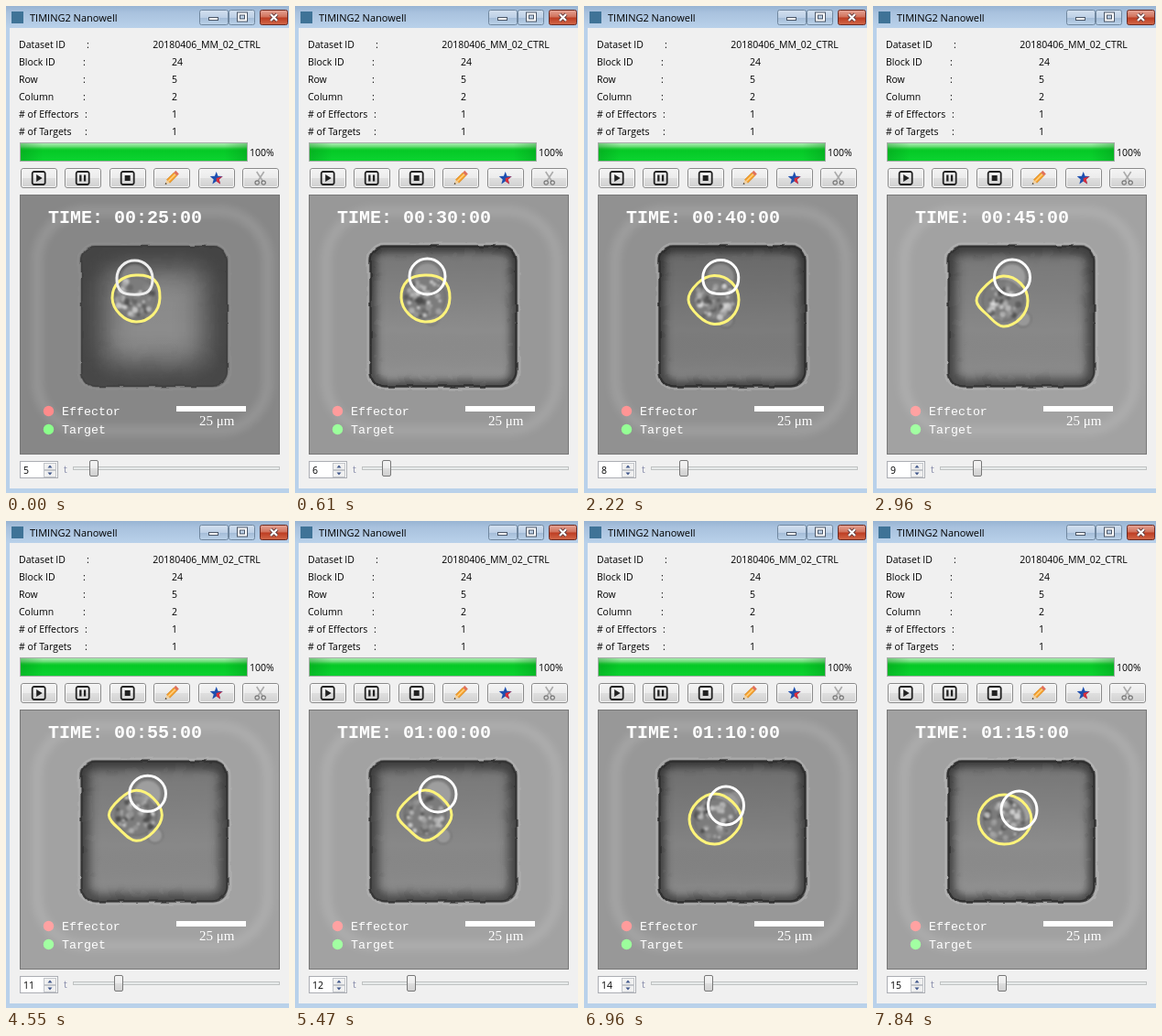
Write an HTML page that moves like this. It is 309x532 px and loops after 8000 ms.

```html
<!DOCTYPE html>
<html lang="en">
<head>
<meta charset="utf-8">
<title>Nanowell viewer</title>
<style>
  html, body { margin: 0; width: 100%; height: 100%; overflow: hidden; background: #f0f0f0; }
  svg { display: block; width: 100%; height: 100%; }
  text { font: 10.5px "Open Sans", "Noto Sans", sans-serif; fill: #000; white-space: pre; }
  .mono { font: 13.3px "Liberation Mono", monospace; fill: #fff; }
  .time { font-size: 20px; font-weight: bold; }
  .scale { font: 15px "Liberation Serif", serif; fill: #fff; }
  .outline { fill: none; stroke-width: 3; stroke-linejoin: round; }
</style>
</head>
<body>
<svg viewBox="0 0 309 532" color-interpolation-filters="sRGB">
  <defs>
    <linearGradient id="titleFill" x2="0" y2="1">
      <stop stop-color="#98b4d3"/><stop offset=".3" stop-color="#a9c2de"/><stop offset="1" stop-color="#b9d1ea"/>
    </linearGradient>
    <linearGradient id="buttonFill" x2="0" y2="1">
      <stop stop-color="#f4f4f4"/><stop offset=".48" stop-color="#ececec"/>
      <stop offset=".52" stop-color="#dedede"/><stop offset="1" stop-color="#d0d0d0"/>
    </linearGradient>
    <linearGradient id="captionFill" x2="0" y2="1">
      <stop stop-color="#d3e0ef"/><stop offset=".5" stop-color="#bdd0e6"/><stop offset=".52" stop-color="#a3bbd6"/><stop offset="1" stop-color="#bcd3ea"/>
    </linearGradient>
    <linearGradient id="closeFill" x2="0" y2="1">
      <stop stop-color="#e6a596"/><stop offset=".48" stop-color="#d0705a"/><stop offset=".52" stop-color="#bd3c22"/><stop offset="1" stop-color="#d2694a"/>
    </linearGradient>
    <linearGradient id="progressFill" x2="0" y2="1">
      <stop stop-color="#b4f0ba"/><stop offset=".2" stop-color="#6bdd78"/><stop offset=".32" stop-color="#1fce38"/>
      <stop offset=".42" stop-color="#05c926"/><stop offset="1" stop-color="#0cd331"/>
    </linearGradient>
    <linearGradient id="progressEnds">
      <stop stop-color="#007d12" stop-opacity=".3"/><stop offset=".1" stop-color="#007d12" stop-opacity="0"/>
      <stop offset=".9" stop-color="#007d12" stop-opacity="0"/><stop offset="1" stop-color="#007d12" stop-opacity=".3"/>
    </linearGradient>
    <linearGradient id="wellShade" x2="0" y2="1">
      <stop stop-color="#000" stop-opacity=".17"/><stop offset=".6" stop-color="#000" stop-opacity="0"/>
      <stop offset="1" stop-color="#fff" stop-opacity=".1"/>
    </linearGradient>
    <filter id="rough" x="-10%" y="-10%" width="120%" height="120%">
      <feTurbulence type="fractalNoise" baseFrequency=".06" numOctaves="2" seed="4"/>
      <feDisplacementMap in="SourceGraphic" scale="4" xChannelSelector="R" yChannelSelector="G"/>
    </filter>
    <clipPath id="view"><rect x="15" y="206" width="284" height="284"/></clipPath>
    <clipPath id="wellClip"><rect x="82" y="262" width="160" height="154" rx="16"/></clipPath>
  </defs>
  <g id="chrome"></g>
  <g id="microscope" clip-path="url(#view)"></g>
  <g id="controls"></g>
</svg>
<script>
const LOOP = 8000, FIRST = 5;
const starts = [0, 610, 1340, 2220, 2960, 3830, 4550, 5470, 6220, 6960, 7840];

// Per step: outer grey, well grey, depth of the wall shadow
const scene = [
  [135, 140, 52], [152, 140, 14], [133, 117, 12], [145, 124, 14], [162, 136, 18], [162, 136, 18],
  [162, 136, 18], [162, 136, 18], [162, 136, 16], [152, 131, 14], [161, 140, 14]
];
// Keyed by step: x, y, rx, ry, flatness of the lower side
const effector = {
  5: [140.5, 297, 19.5, 19, 1.6], 6: [144.5, 295.5, 19.5, 19.5, 0], 7: [146.5, 296, 19.5, 18, 2.2],
  9: [152, 296.5, 19.5, 19.5, 0], 12: [156, 298.5, 20, 19.5, 0], 14: [155, 311, 19.5, 21, 0], 15: [159.5, 316, 19.5, 21, 0]
};
// Keyed by step: x, y, then radii clockwise from the right
const target = {
  5: [142, 319, 26, 26, 26, 25, 26, 26, 25, 28], 6: [142, 319, 27, 27, 26, 25, 26, 27, 25, 28],
  7: [142, 320, 27, 27, 25, 26, 27, 26, 26, 27], 9: [142, 322, 27, 27, 28, 23, 29, 25, 27, 27],
  12: [142, 321, 29, 26, 28, 24, 30, 25, 27, 26], 14: [143, 326, 29, 26, 27, 27, 28, 27, 28, 27],
  15: [143, 326, 30, 28, 27, 27, 28, 27, 27, 28]
};
// Keyed by step: centre of the pale bulge beside the cell
const bulge = { 5: [143, 339], 6: [149, 340], 7: [146, 344], 9: [164, 342], 12: [162, 344], 14: [165, 303], 15: [152, 330] };

const $ = id => document.getElementById(id);
const grey = v => `rgb(${v},${v},${v})`;
const rect = (x, y, w, h, fill, more = '') => `<rect x="${x}" y="${y}" width="${w}" height="${h}" fill="${fill}" ${more}/>`;
const circle = (x, y, r, fill, more = '') => `<circle cx="${x}" cy="${y}" r="${r}" fill="${fill}" ${more}/>`;
const path = (d, fill, more = '') => `<path d="${d}" fill="${fill}" ${more}/>`;
const label = (x, y, s, more = '') => `<text x="${x}" y="${y}" ${more}>${s}</text>`;
const blur = px => `style="filter:blur(${px}px)"`;

function keyed(table, step) {
  if (table[step]) return table[step];
  const keys = Object.keys(table).map(Number);
  const b = keys.find(k => k > step), a = keys[keys.indexOf(b) - 1];
  return table[a].map((v, i) => v + (table[b][i] - v) * (step - a) / (b - a));
}

// Closed smooth curve through eight points around a centre
function blob(x, y, radii) {
  const pts = radii.map(([rx, ry], i) => [x + rx * Math.cos(i * Math.PI / 4), y + ry * Math.sin(i * Math.PI / 4)]);
  const at = i => pts[(i + 8) % 8];
  const handle = (i, s) => at(i).map((v, k) => v + s * (at(i + 1)[k] - at(i - 1)[k]) / 5.5);
  return `M${at(0)}` + pts.map((_, i) => `C${handle(i, 1)} ${handle(i + 1, -1)} ${at(i + 1)}`).join('') + 'Z';
}

function randomizer(seed) {
  return () => {
    seed = (seed * 1664525 + 1013904223) % 4294967296;
    return seed / 4294967296;
  };
}

function drawChrome() {
  let s = rect(0, 0, 309, 532, '#b9d1ea') + rect(0, 0, 309, 24, 'url(#titleFill)') + rect(4, 24, 305, 503, '#f0f0f0')
    + rect(6, 6, 13, 13, '#3f7397') + label(26, 17, 'TIMING2 Nanowell', 'style="font-size:11px"');
  s += rect(211.5, 4.5, 31, 16, 'url(#captionFill)', 'rx="2" stroke="#70879f"')
    + rect(243.5, 4.5, 28, 16, 'url(#captionFill)', 'rx="2" stroke="#70879f"')
    + rect(277.5, 4.5, 30, 16, 'url(#closeFill)', 'rx="2" stroke="#6b2a22"')
    + rect(221.5, 12.5, 10, 3, '#fff', 'stroke="#4b5768"')
    + rect(254, 8.5, 8, 7, 'none', 'stroke="#4b5768" stroke-width="4"')
    + rect(254, 8.5, 8, 7, 'none', 'stroke="#fff" stroke-width="2"')
    + path('M289 9l7 7m0-7l-7 7', 'none', 'stroke="#643a3a" stroke-width="4"')
    + path('M289 9l7 7m0-7l-7 7', 'none', 'stroke="#fff" stroke-width="2.2"');

  [['Dataset ID', 88, '20180406_MM_02_CTRL', 219], ['Block ID', 84, '24', 187], ['Row', 84, '5', 184],
   ['Column', 84, '2', 184], ['# of Effectors', 86, '1', 184], ['# of Targets', 86, '1', 184]]
    .forEach(([name, colon, value, x], i) => {
      const y = 46 + i * 19;
      s += label(14, y, name) + label(colon, y, ':', 'font-weight="bold"') + label(x, y, value, 'text-anchor="middle"');
    });

  s += rect(15.5, 149.5, 248, 20, 'url(#progressFill)', 'stroke="#a5aca7"')
    + rect(16, 150, 247, 19, 'url(#progressEnds)') + label(266, 164, '100%');

  const frame = rect(-7, -7, 14, 14, 'none', 'rx="2" stroke="#222" stroke-width="1.8"');
  const icons = [
    frame + path('M-2.5-4L4 0L-2.5 4Z', '#222'),
    frame + rect(-3.5, -3.5, 2.3, 7, '#222') + rect(1.2, -3.5, 2.3, 7, '#222'),
    frame + rect(-3, -3, 6, 6, '#222'),
    '<g transform="rotate(45)">' + rect(-2.5, -6, 5, 11, '#f5a02c', 'stroke="#c87813" stroke-width=".5"')
      + rect(-2.5, -9, 5, 3, '#e0705a') + rect(-.8, -6, 1.6, 11, '#ffd080') + path('M-2.5 5h5L0 10Z', '#f0d0a0') + path('M-1 8h2L0 10Z', '#222') + '</g>',
    path('M0-7L1.8-2.2L7-2L3 1.4L4.4 6.5L0 3.6L-4.4 6.5L-3 1.4L-7-2L-1.8-2.2Z', '#1d4fb0')
      + path('M0 0L7-2L3 1.4L4.4 6.5L0 3.6Z', '#dc2f3a'),
    path('M-4-7L2.5 3M4-7L-2.5 3', 'none', 'stroke="#aaa" stroke-width="1.6"')
      + circle(-3.5, 5, 2.2, 'none', 'stroke="#777" stroke-width="1.2"') + circle(3.5, 5, 2.2, 'none', 'stroke="#777" stroke-width="1.2"')
  ];
  icons.forEach((icon, i) => {
    const x = Math.round(16 + i * 48.4);
    s += rect(x + .5, 177.5, 39, 21, 'url(#buttonFill)', 'rx="2.5" stroke="#8a8a8a"')
      + rect(x + 1.5, 178.5, 37, 19, 'none', 'rx="1.5" stroke="#fafafa" stroke-opacity=".8"')
      + `<g transform="translate(${x + 19.7} 188)">${icon}</g>`;
  });
  $('chrome').innerHTML = s;
}

function drawWell([tone, well, depth]) {
  const box = (grow, fill, more) => rect(82 - grow, 262 - grow, 160 + 2 * grow, 154 + 2 * grow, fill, `rx="${16 + grow}" ${more}`);
  const sharpness = Math.min(1, 14 / depth);
  return rect(15, 206, 284, 284, grey(tone))
    + rect(34, 224, 252, 240, 'none', `rx="55" stroke="#fff" stroke-opacity=".14" stroke-width="10" ${blur(5)}`)
    + '<g filter="url(#rough)">'
    + box(2.5, 'none', `stroke="#fff" stroke-opacity="${.18 * sharpness}" stroke-width="2"`)
    + box(0, grey(well), '') + box(0, 'url(#wellShade)', `opacity="${sharpness}"`)
    + `<g clip-path="url(#wellClip)">${box(0, 'none', `stroke="#101010" stroke-opacity=".58" stroke-width="${depth}" ${blur(depth / 3.5)}`)}</g>`
    + box(-.5, 'none', `stroke="#2b2b2b" stroke-opacity="${.85 * sharpness}" stroke-width="2.4"`) + '</g>';
}

function drawCells(step, tone) {
  const [ex, ey, rx, ry, flat] = keyed(effector, step);
  const [tx, ty, ...radii] = keyed(target, step);
  const [bx, by] = keyed(bulge, step);
  const lower = [0, flat, -flat / 2, flat, 0, 0, 0, 0];
  const effectorPath = blob(ex, ey, lower.map(d => [rx + d, ry + d]));
  const targetPath = blob(tx, ty, radii.map(r => [r, r]));
  const random = randomizer(step * 977);
  let spots = '';
  for (let i = 0; i < 48; i++) {
    const angle = random() * Math.PI * 2, dist = 21 * Math.sqrt(random());
    const shade = i % 4 ? 135 + random() * 95 : 60 + random() * 40;
    spots += circle(tx + dist * Math.cos(angle), ty + dist * Math.sin(angle), 1.4 + random() * 2.2, grey(Math.round(shade)), 'opacity=".75"');
  }
  return `<g ${blur(.8)}>`
    + circle(bx, by, 8.5, grey(tone - 10), 'stroke="#505050" stroke-opacity=".7"')
    + circle(ex, ey, 15, grey(tone + 8), 'opacity=".75" stroke="#555" stroke-opacity=".5"')
    + circle(tx, ty, 22.5, '#7c7c7c', 'stroke="#505050" stroke-opacity=".6"') + spots + '</g>'
    + path(targetPath, 'none', 'class="outline" stroke="#fff47a"')
    + path(effectorPath, 'none', `class="outline" stroke="${step === FIRST ? '#eee' : '#fff'}"`);
}

function drawLegend(step, tone) {
  const minutes = step * 5, pad = v => String(v).padStart(2, '0');
  const tint = Math.min(tone + 4, 162);
  return label(46, 237, `TIME: ${pad(Math.floor(minutes / 60))}:${pad(minutes % 60)}:00`, 'class="mono time"')
    + circle(46.5, 442.5, 5.7, `rgb(255,${tint},${tint})`) + label(61, 447, 'Effector', 'class="mono"')
    + circle(46.5, 462.5, 5.7, `rgb(${tint},255,${tint})`) + label(61, 467, 'Target', 'class="mono"')
    + rect(186, 437, 76, 6, '#fff') + label(211, 458, '25 μm', 'class="scale"');
}

function drawControls(step) {
  const x = Math.floor(96 + (step - FIRST) * 4.5);
  return rect(15.5, 206.5, 283, 283, 'none', 'stroke="#777"')
    + rect(15.5, 497.5, 41, 18, '#fff', 'stroke="#abadb3"') + label(19, 511, step)
    + rect(41.5, 499.5, 13, 7, '#f0f0f0', 'stroke="#c2c5ca"') + rect(41.5, 507.5, 13, 7, '#f0f0f0', 'stroke="#c2c5ca"')
    + path('M45.5 504.5h5L48 501.5ZM45.5 509.5h5L48 512.5Z', '#43598c')
    + label(63, 510, 't', 'style="fill:#8589a8"')
    + rect(73.5, 503.5, 225, 3, '#e7eaea', 'stroke="#bfc2c2"')
    + rect(x - 4.5, 496.5, 9, 17, 'url(#buttonFill)', 'rx="1.5" stroke="#777"');
}

let shown = -1;
function tick(now) {
  const t = now % LOOP;
  const index = starts.filter(s => s <= t).length - 1;
  if (index !== shown) {
    shown = index;
    const step = FIRST + index, tone = scene[index][0];
    $('microscope').innerHTML = drawWell(scene[index]) + drawCells(step, tone) + drawLegend(step, tone);
    $('controls').innerHTML = drawControls(step);
  }
  requestAnimationFrame(tick);
}

drawChrome();
tick(performance.now());
</script>
</body>
</html>
```
